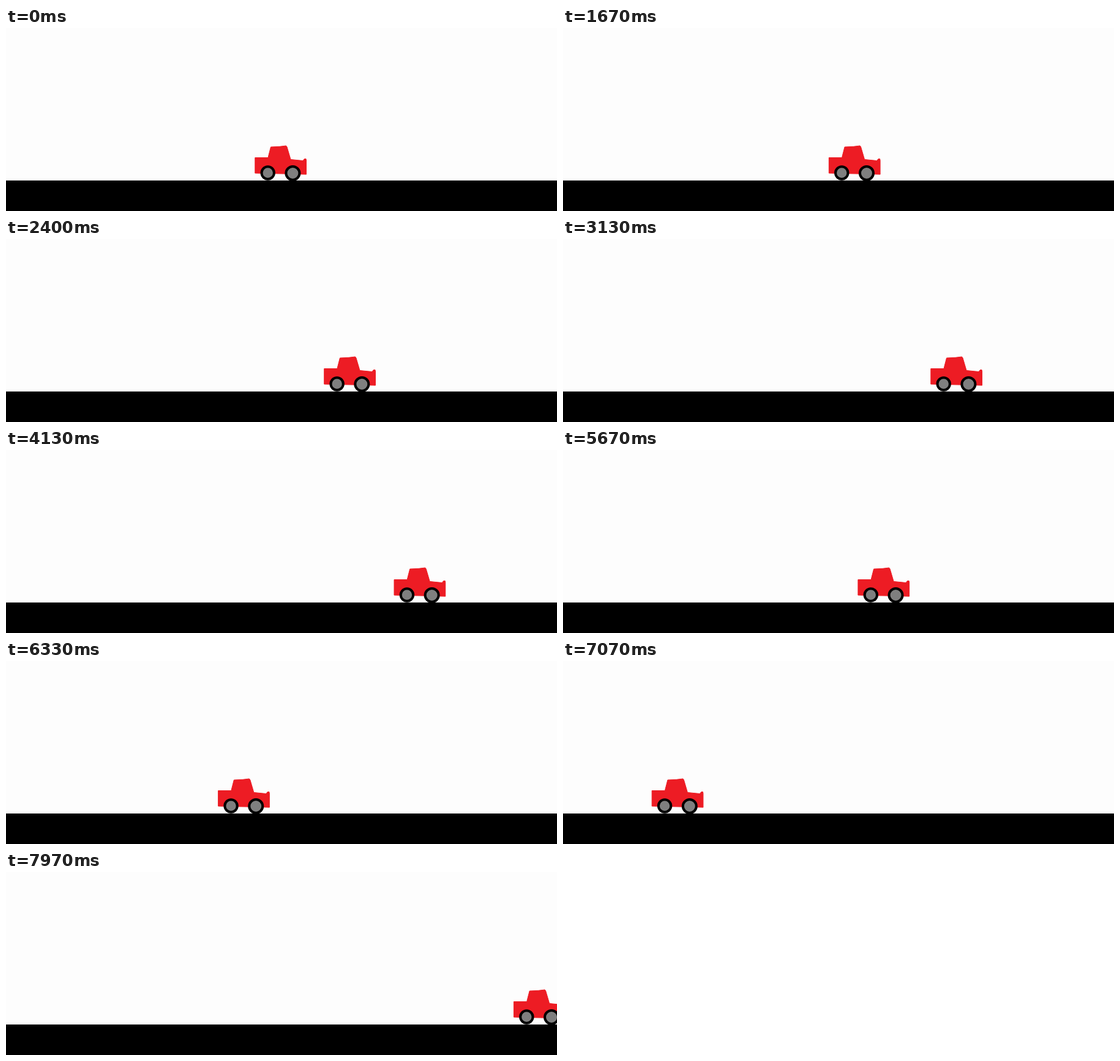
An HTML page that plays this animation: 900x300 px, repeating every 8 s.

```html
<!DOCTYPE html>
<html>
<head>
<meta charset="utf-8">
<style>
html, body { margin: 0; width: 100%; height: 100%; overflow: hidden; background: #fdfdfd; }
svg { display: block; }
</style>
</head>
<body>
<svg width="900" height="300" viewBox="0 0 900 300">
  <g id="car">
    <path fill="#ed1c24" stroke="#ed1c24" stroke-linejoin="round"
      d="M.8 212.5H22L26.5 195L41 194.3L51.5 193L53 195L59 215.5L79 217.5L81.5 214.5H84L84.5 217V240L62 239.3L.8 238Z"/>
    <g fill="#7f7f7f" stroke="#000" stroke-width="4">
      <circle cx="21.7" cy="237.5" r="10.2"/>
      <circle cx="62.4" cy="238" r="11"/>
    </g>
  </g>
  <rect y="250" width="900" height="50"/>
</svg>
<script>
const LOOP = 8000, WRAP = 1000;
const car = document.getElementById('car');

// Left edge of the car: constant acceleration in each phase of the drive
function position(t) {
  const rolling = 407 - 2.5e-5 * Math.max(0, 200 - t) ** 2;
  const forward = rolling + 5.565e-5 * Math.max(0, t - 980) ** 2;
  const braking = 634 - 4.5e-5 * (t - 4000) ** 2;
  const reverse = 637.5 - 4.8e-5 * (t - 3866) ** 2;
  return t < 2330 ? forward : Math.min(braking, reverse);
}

function draw() {
  let x = position(performance.now() % LOOP);
  if (x < -93) x += WRAP;
  car.setAttribute('transform', `translate(${x.toFixed(2)})`);
  requestAnimationFrame(draw);
}
draw();
</script>
</body>
</html>
```
